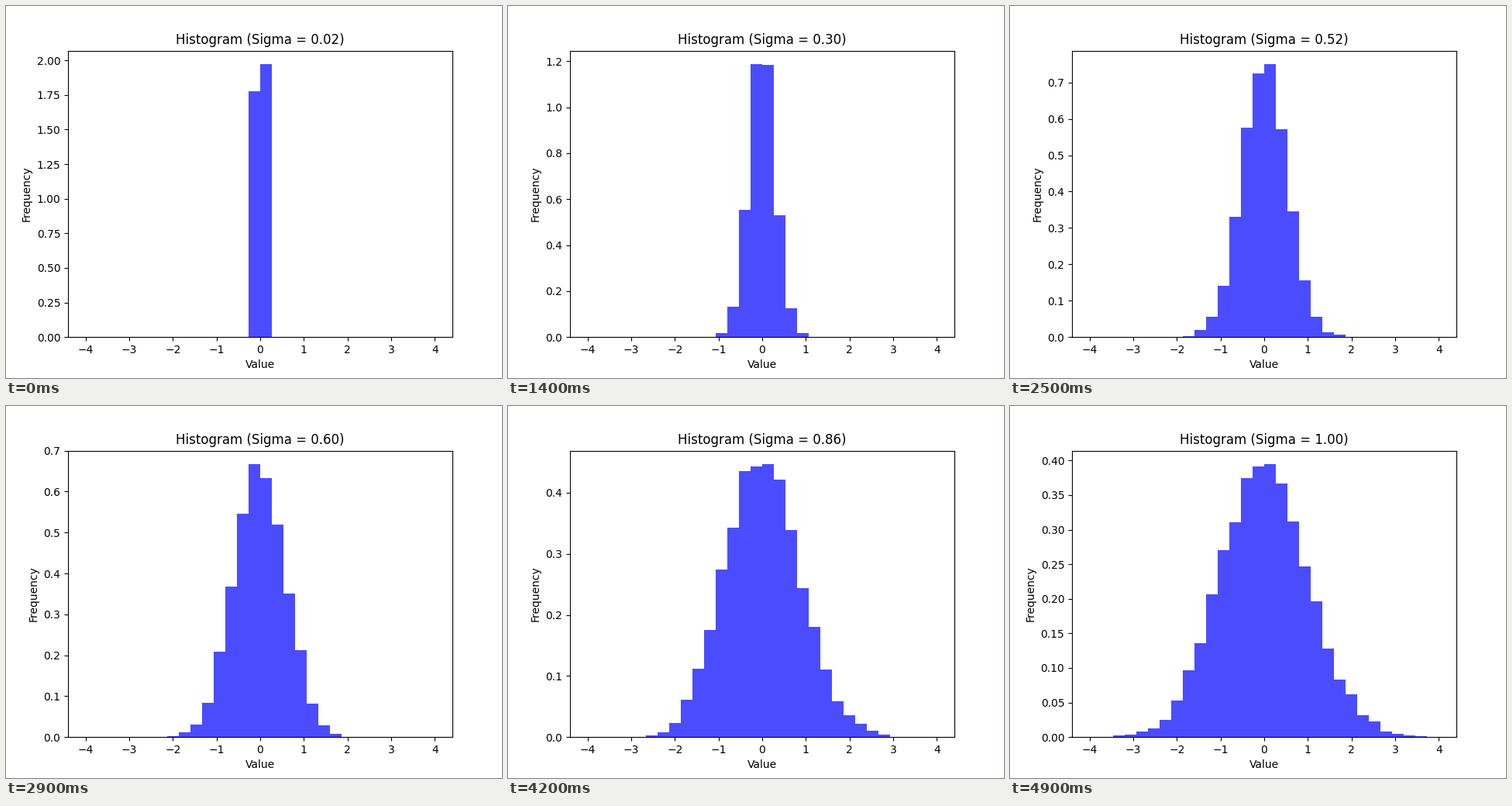
A matplotlib script that plays this animation: 640x480 px, repeating every 5000 ms.

```python
import math
import random

import numpy as np
import matplotlib.pyplot as plt
from matplotlib.animation import FuncAnimation

FRAMES = 50
INTERVAL = 100
STEPS = 20000
STEP_SIZE = 0.5
EDGES = np.linspace(-4, 4, 31)
SIGMAS = np.linspace(0.02, 1, FRAMES)


def metropolis(sigma, seed):
    """Random walk whose visited values follow a normal distribution."""
    rng = random.Random(seed)
    x, values = 0.0, []
    for _ in range(STEPS):
        candidate = x + rng.gauss(0, STEP_SIZE)
        log_ratio = (x * x - candidate * candidate) / (2 * sigma * sigma)
        if log_ratio >= 0 or rng.random() < math.exp(log_ratio):
            x = candidate
        values.append(x)
    return values


fig, ax = plt.subplots(figsize=(6.4, 4.8), dpi=100)


def update(frame):
    sigma = float(SIGMAS[frame])
    ax.clear()
    ax.hist(metropolis(sigma, frame), bins=EDGES, density=True,
            color="blue", alpha=0.7)
    ax.set_title(f"Histogram (Sigma = {sigma:.2f})")
    ax.set_xlabel("Value")
    ax.set_ylabel("Frequency")


anim = FuncAnimation(fig, update, frames=FRAMES, interval=INTERVAL,
                     repeat=True, repeat_delay=0)
plt.show()
```
